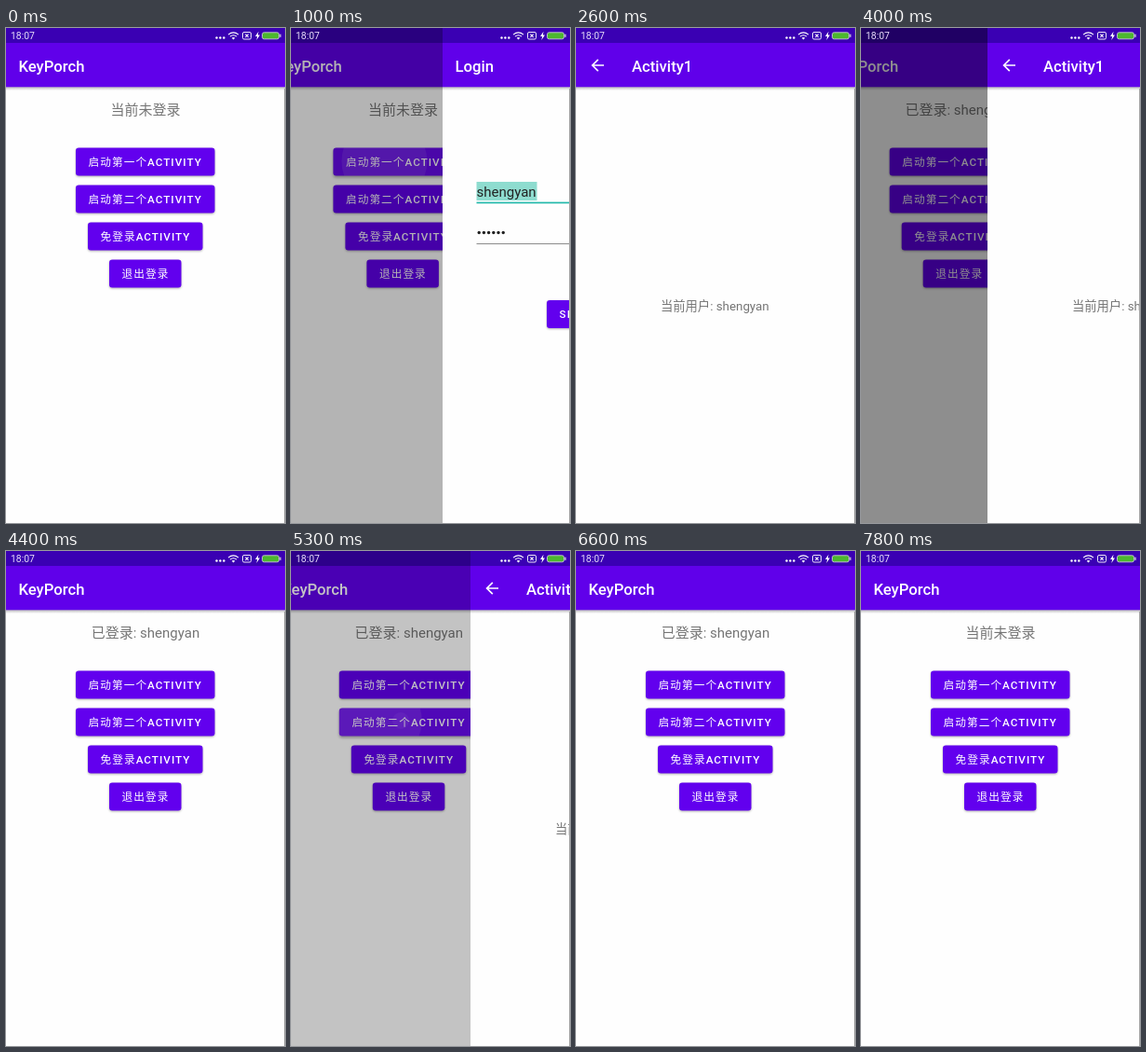
These frames come from a looping animation (300x531 px, 8 s). An HTML page:

```html
<!DOCTYPE html>
<html lang="zh-CN">
<head>
<meta charset="utf-8">
<title>Login flow</title>
<style>
  html, body { margin: 0; width: 100%; height: 100%; overflow: hidden; background: #fefefe; }
  svg { display: block; width: 300px; height: 531px; }
  text { font-family: Roboto, "Noto Sans CJK SC", "Noto Sans CJK", sans-serif; white-space: pre; }
  .title { font-size: 16.67px; font-weight: 500; fill: #fff; }
  .label { font-size: 11.67px; font-weight: 500; letter-spacing: 1.04px; fill: #fff; }
  .zh { font-weight: 400; }
  .note { fill: #757575; text-anchor: middle; }
  .button { filter: drop-shadow(0 1px 1px rgba(0, 0, 0, .3)); }
  .button.down { filter: drop-shadow(0 2px 1.8px rgba(0, 0, 0, .3)); }
</style>
</head>
<body>
<svg id="stage" viewBox="0 0 300 531"></svg>
<script>
const LOOP = 8000, STEP = 100, W = 300, H = 531;
const USER = 'shengyan';

const button = (id, x, y, w, zh, latin) => `
  <g id="${id}" class="button">
    <clipPath id="${id}-clip"><rect x="${x}" y="${y}" width="${w}" height="30" rx="3.3"/></clipPath>
    <rect x="${x}" y="${y}" width="${w}" height="30" rx="3.3" fill="#6200ee"/>
    <g clip-path="url(#${id}-clip)">
      <rect class="tint" x="${x}" y="${y}" width="${w}" height="30" fill="#fff" opacity="0"/>
      <circle class="wave" fill="#fff" opacity="0"/>
    </g>
    <text class="label" x="${x + 13.6}" y="${y + 19.3}"><tspan class="zh">${zh}</tspan>${latin}</text>
  </g>`;

const page = (id, title, titleX, body) => `
  <g id="${id}">
    <rect width="${W}" height="${H}" fill="#fefefe"/>
    <rect y="63" width="${W}" height="4" fill="url(#shade)"/>
    <rect width="${W}" height="16.5" fill="#3a00b3"/>
    <rect y="16" width="${W}" height="47.3" fill="#6000ea"/>
    <text class="title" x="${titleX}" y="46.5">${title}</text>
    ${body}
    <rect class="dim" width="${W}" height="${H}" opacity="0"/>
  </g>`;

const dots = (n, x, y, gap, r, fill) =>
  Array.from({ length: n }, (_, i) => `<circle cx="${x + i * gap}" cy="${y}" r="${r}" fill="${fill}"/>`).join('');

const home = page('home', 'KeyPorch', 13.5, `
  <text id="state" class="note" x="150" y="93" font-size="15"></text>
  ${button('first', 75, 128.5, 149.5, '启动第一个', 'ACTIVITY')}
  ${button('second', 75, 168.5, 149.5, '启动第二个', 'ACTIVITY')}
  ${button('free', 88, 208.5, 123.5, '免登录', 'ACTIVITY')}
  ${button('logout', 111, 248.5, 77.5, '退出登录', '')}`);

const login = page('login', 'Login', 13.5, `
  <rect x="36.5" y="165" width="65" height="20" fill="#8edccf"/>
  <text x="36.5" y="181" font-size="15" fill="#222">${USER}</text>
  <rect x="36.5" y="186.6" width="226.5" height="1.7" fill="#22b8aa"/>
  ${dots(6, 39.2, 219.5, 5.2, 1.7, '#222')}
  <rect x="36.5" y="231" width="226.5" height="1" fill="#8c8c8c"/>
  ${button('sign', 112, 292, 76, '', 'SIGN IN')}`);

const detail = page('detail', '', 60, `
  <path d="M30 40H18M23.8 33.8L17.6 40L23.8 46.2" fill="none" stroke="#fff" stroke-width="1.7"/>
  <text class="note" x="149.3" y="303" font-size="13.33">当前用户: ${USER}</text>`);

const statusBar = `
  <text x="5" y="12.2" font-size="10.4" fill="#e6dcf8">18:07</text>
  ${dots(3, 226.5, 10.5, 3.9, 1.2, '#fff')}
  <g fill="none" stroke="#fff" stroke-width="1.1">
    <path d="M239 7.2Q244.5 2.6 250 7.2M240.9 9.2Q244.5 6.2 248.1 9.2"/>
    <path d="M242.6 10.6L244.5 12.6L246.4 10.6Q244.5 9.4 242.6 10.6Z" fill="#fff" stroke="none"/>
    <rect x="254.5" y="4.5" width="9" height="7.5" rx="1.5" stroke-width=".9"/>
    <path d="M257.4 6.6L260.6 9.8M260.6 6.6L257.4 9.8"/>
  </g>
  <path d="M271.5 3.8L268 9H270.2L269.3 13L273 7.5H270.8Z" fill="#fff"/>
  <rect x="275.5" y="4.8" width="18" height="7" rx="2" fill="#4cb82e" stroke="#c9c4d8" stroke-width=".9"/>
  <rect x="294.3" y="6.6" width="1.4" height="3.4" rx=".6" fill="#c9c4d8"/>`;

document.getElementById('stage').innerHTML = `
  <defs><linearGradient id="shade" x2="0" y2="1">
    <stop stop-opacity=".28"/><stop offset="1" stop-opacity="0"/>
  </linearGradient></defs>
  ${home}${login}${detail}
  <rect x="299" y="65" width="1" height="466" fill="#a8a8a8"/>
  ${statusBar}
  <circle id="finger" r="9" fill="#fff" opacity="0"/>`;

const $ = id => document.getElementById(id);
const set = (el, attrs) => { for (const k in attrs) el.setAttribute(k, attrs[k]); };
const pages = ['home', 'login', 'detail'];

// Page slides: the front page covers or uncovers the back page.
const slides = [
  { at: 945, len: 300, back: 'home', front: 'login', open: true },
  { at: 2287, len: 300, back: 'login', front: 'detail', open: true, name: 'Activity1' },
  { at: 3927, len: 400, back: 'home', front: 'detail', name: 'Activity1' },
  { at: 5259, len: 300, back: 'home', front: 'detail', open: true, name: 'Activity2' },
  { at: 6207, len: 400, back: 'home', front: 'detail', name: 'Activity2' },
];

const taps = [
  { at: 700, hold: 200, id: 'first', x: 130, y: 143 },
  { at: 2100, hold: 300, id: 'sign', x: 167, y: 299 },
  { at: 5000, hold: 400, id: 'second', x: 118, y: 182 },
  { at: 7000, hold: 200, id: 'logout', x: 155, y: 264 },
];

const clamp = v => Math.min(1, Math.max(0, v));
const easeOut = u => 1 - (1 - clamp(u)) ** 3;

function place(id, x, dim) {
  set($(id), { transform: `translate(${x.toFixed(1)} 0)`, display: 'inline' });
  set($(id).querySelector('.dim'), { opacity: dim });
}

function drawSlides(t) {
  for (const id of pages) set($(id), { display: 'none' });
  const s = slides.filter(s => t >= s.at).pop();
  if (!s) return place('home', 0, 0);
  const done = easeOut((t - s.at) / s.len);
  const cover = s.open ? done : 1 - done;
  const lag = s.open ? 0.65 : 0.81;
  if (s.name) $('detail').querySelector('.title').textContent = s.name;
  if (cover < 1) place(s.back, -100 * lag * cover, lag * cover);
  if (cover > 0) place(s.front, Math.round(W * (1 - cover)), 0);
}

function drawTaps(t) {
  let finger = { opacity: 0 };
  for (const { at, hold, id, x, y } of taps) {
    const age = t - at, on = age >= 0 && age < 800;
    const fade = on ? clamp((800 - age) / 400) : 0;
    const el = $(id);
    el.classList.toggle('down', on && age < 500);
    set(el.querySelector('.tint'), { opacity: 0.04 * fade });
    set(el.querySelector('.wave'), { cx: x, cy: y, r: on ? 10 + age * 0.12 : 0, opacity: 0.09 * fade });
    if (on && age < hold) finger = { cx: x, cy: y, opacity: 0.18 * (1 - age / hold) };
  }
  set($('finger'), finger);
}

function draw(now) {
  const t = Math.floor((now % LOOP) / STEP) * STEP;
  $('state').textContent = t >= 2300 && t < 7300 ? `已登录: ${USER}` : '当前未登录';
  drawSlides(t);
  drawTaps(t);
}

const start = performance.now();
function tick() {
  draw(performance.now() - start);
  requestAnimationFrame(tick);
}
tick();
</script>
</body>
</html>
```
